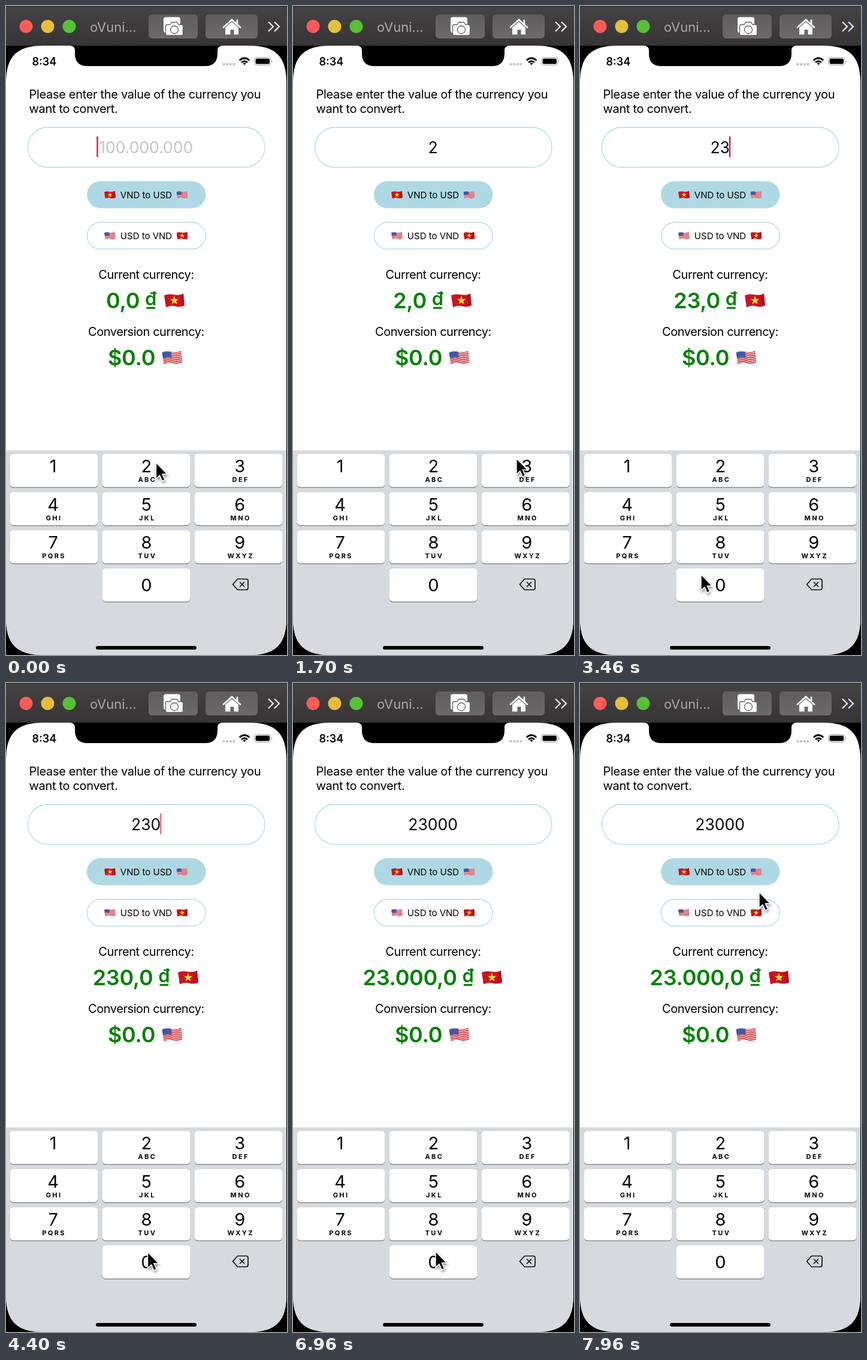
An HTML page that plays this animation: 469 by 1080 pixels, repeating every 8000 ms.

```html
<!DOCTYPE html>
<html lang="en">
<head>
<meta charset="utf-8">
<title>Currency converter</title>
<style>
  html, body { margin: 0; height: 100%; overflow: hidden; background: #000; }
  svg { display: block; font-family: Inter, Roboto, sans-serif; }
  .mid { text-anchor: middle; }
  .label { font-size: 20px; letter-spacing: -.45px; }
  .intro { font-size: 20px; letter-spacing: -.32px; }
  .small { font-size: 15px; }
  .input { font-size: 26.5px; }
  .money { font-size: 36px; font-weight: 600; letter-spacing: -.3px; fill: #0a800a; }
  .dong { font-size: 31px; }
  .digit { font-size: 29px; }
  .letters { font-size: 11px; font-weight: 700; letter-spacing: 2.4px; }
</style>
</head>
<body>
<svg id="stage" width="469" height="1080" viewBox="0 0 469 1080">
  <defs>
    <linearGradient id="bar" x2="0" y2="1"><stop stop-color="#454344"/><stop offset="1" stop-color="#363435"/></linearGradient>
    <linearGradient id="button" x2="0" y2="1"><stop stop-color="#5f5d5e"/><stop offset="1" stop-color="#6b696a"/></linearGradient>
    <clipPath id="screen"><path d="M0 128C0 84 18 66 62 66H406C450 66 468 84 468 128V1018C468 1062 450 1080 406 1080H62C18 1080 0 1062 0 1018Z"/></clipPath>
    <clipPath id="wave"><path d="M0 3.500C6 1 11 1.500 17 2.500S28 3 32 .5L34 20C28 23 23 23 18 21.500S9 20.500 3 23.500Z"/></clipPath>
    <filter id="shadow" x="-50%" y="-30%" width="220%" height="180%"><feDropShadow dx="1" dy="3" stdDeviation="2" flood-opacity=".45"/></filter>
    <symbol id="vn" viewBox="0 0 34 24">
      <g clip-path="url(#wave)">
        <rect width="34" height="24" fill="#cb1220"/>
        <path d="M26 0h8v24h-5z" fill="#9c0c1a" opacity=".45"/>
        <path d="M17 4.500l1.800 5 5.400.2-4.200 3.300 1.500 5.200-4.500-3-4.400 3 1.500-5.200L9.800 9.700l5.400-.2z" fill="#ffdf2b"/>
      </g>
    </symbol>
    <symbol id="us" viewBox="0 0 34 24">
      <g clip-path="url(#wave)">
        <rect width="34" height="24" fill="#f2efef"/>
        <g id="stripes" fill="none" stroke="#cf2a35" stroke-width="1.700"></g>
        <path d="M0 3C6 0 11 1 15 2L16 12C11 10.500 7 11 1.500 13Z" fill="#34499a"/>
        <path d="M3 4.500q6-3 11-.5M3.500 7.300q6-3 11-.5M4 10q6-3 11-.5" fill="none" stroke="#b9c2e0" stroke-dasharray="1 1.500"/>
      </g>
    </symbol>
  </defs>

  <rect width="469" height="66" fill="url(#bar)"/>
  <path d="M0 .5H469" stroke="#1c2227"/>
  <circle cx="33.500" cy="34" r="11" fill="#fc5b57"/>
  <circle cx="69.500" cy="34" r="11" fill="#e5bf3c"/>
  <circle cx="105.500" cy="34" r="11" fill="#57c038"/>
  <text x="140" y="43" font-size="22" fill="#aaa8a9">oVuni...</text>
  <g fill="url(#button)"><rect x="238" y="14" width="82" height="40" rx="6"/><rect x="333" y="14" width="87" height="40" rx="6"/></g>
  <g fill="#fff" stroke="#626061" stroke-width="1.300">
    <rect x="263" y="18.500" width="28" height="26" rx="3.500" stroke="none"/>
    <path d="M269 31h5l2.500-4h9l2.500 4h5q2.500 0 2.500 2.500v13q0 2.500-2.500 2.500h-24q-2.500 0-2.500-2.500v-13q0-2.500 2.500-2.500z"/>
    <circle cx="281" cy="39.500" r="6.500"/>
  </g>
  <path d="M366 36l11-9.500 11 9.500v11.500h-7.500v-8h-6v8H366z" fill="#fff"/>
  <path d="M363 35.500l14-12.500 14 12.500M386 24v6" fill="none" stroke="#fff" stroke-width="2.800" stroke-linecap="round"/>
  <path d="M438 26.500l8 7.800-8 7.800M448 26.500l8 7.800-8 7.800" fill="none" stroke="#e8e8e8" stroke-width="2.200"/>

  <g clip-path="url(#screen)">
    <rect y="66" width="468" height="1014" fill="#fefffe"/>
    <rect y="739.500" width="468" height="341" fill="#d6d9dd"/>
  </g>
  <path d="M107 66q8 .5 8 8v5q0 21 21 21H332q21 0 21-21v-5q0-7.500 8-8z"/>
  <text x="43.500" y="98.500" font-size="18" font-weight="600">8:34</text>
  <path d="M361.500 97h21" stroke="#c9c9c9" stroke-width="4" stroke-dasharray="4 1.600"/>
  <g fill="none" stroke="#000" stroke-width="2.800">
    <path d="M389.800 90.500q8.200-7.500 16.400 0M393 94q5-4.500 10 0"/>
    <path d="M395.500 95.600q2.500-2 5 0l-2.500 2.600z" fill="#000" stroke="none"/>
  </g>
  <rect x="414.500" y="85.500" width="27.500" height="13" rx="4" fill="none" stroke="#a2a2a2"/>
  <rect x="416.500" y="87.500" width="23.500" height="9" rx="2.300"/>
  <path d="M443.500 90q2 2 0 4.500z" fill="#999"/>

  <text class="intro" x="38.500" y="154">Please enter the value of the currency you</text>
  <text class="intro" x="38.500" y="178">want to convert.</text>
  <g fill="none" stroke="#b5dbe7" stroke-width="1.300">
    <rect x="36.500" y="202" width="395.500" height="66.500" rx="33.200"/>
    <rect x="135.500" y="360" width="197.500" height="44.500" rx="22.200"/>
  </g>
  <rect x="135" y="291.500" width="198.500" height="45" rx="22.500" fill="#aed9e4"/>
  <text class="small mid" x="234" y="320">VND to USD</text>
  <text class="small mid" x="234" y="388">USD to VND</text>
  <text class="label mid" x="234" y="454">Current currency:</text>
  <text class="label mid" x="234" y="549">Conversion currency:</text>
  <text class="money mid" x="209.500" y="598">$0.0</text>
  <use href="#vn" x="164" y="307.500" width="19" height="13.400"/>
  <use href="#us" x="284.500" y="307.500" width="19" height="13.400"/>
  <use href="#us" x="164" y="375.500" width="19" height="13.400"/>
  <use href="#vn" x="284.500" y="375.500" width="19" height="13.400"/>
  <use href="#us" x="260.500" y="573" width="34" height="24"/>

  <text id="value" class="input mid" x="233.700" y="244.500"></text>
  <rect id="caret" y="217" width="2.400" height="34.500" fill="#df1426"/>
  <text class="money mid" x="209" y="503"><tspan id="amount"></tspan> <tspan class="dong" dy="-5">₫</tspan></text>
  <use id="flag" href="#vn" y="478" width="34" height="24"/>
  <g id="keys"></g>
  <path d="M386.500 953.500H401q3 0 3 3v12q0 3-3 3H386.500L378.500 962.500ZM390 958.500l8 8m0-8l-8 8" fill="none" stroke="#111" stroke-width="1.700" stroke-linejoin="round"/>
  <rect x="150" y="1065" width="168" height="6" rx="3"/>
  <path id="cursor" d="M0 0V26.500L6 21l4.300 9.500 4.200-2L10.400 19H18.500Z" stroke="#fff" stroke-width="1.400" filter="url(#shadow)"/>
</svg>
<script>
const LOOP = 8000;
const $ = id => document.getElementById(id);

// Time of entry, field text, amount, flag x
const entries = [
  [-300, '', '0,0', 264], [745, '2', '2,0', 264], [2000, '23', '23,0', 275],
  [3830, '230', '230,0', 287], [4660, '2300', '2.300,0', 303], [6100, '23000', '23.000,0', 315]
];
// Key, pressed from, released at
const presses = [
  ['2', 500, 755], ['3', 1790, 2015], ['0', 3640, 3850], ['0', 4510, 4690], ['0', 5890, 6120]
];
// Time, x, y of the pointer
const path = [
  [0, 250.5, 760], [1130, 250.5, 760], [1420, 373, 753], [2560, 373, 753],
  [3290, 201.5, 943], [3400, 202, 946], [3470, 202, 946], [3640, 236.5, 947],
  [5200, 236.5, 947], [5400, 238, 947], [6940, 238, 947], [6960, 238, 946], [7150, 238, 946],
  [7450, 228, 760], [7890, 297, 351], [7960, 299, 348], [LOOP, 299, 348]
];

$('stripes').innerHTML = Array.from({ length: 8 }, (_, i) =>
  `<path d="M0 ${3 + i * 3}C7 ${i * 3} 12 ${i * 3} 17 ${2 + i * 3}S27 ${4 + i * 3} 34 ${1 + i * 3}"/>`).join('');

const keyLetters = ['', 'ABC', 'DEF', 'GHI', 'JKL', 'MNO', 'PQRS', 'TUV', 'WXYZ'];
const drawKey = (digit, col, row, letters) => {
  const x = 6.5 + col * 154, y = 745.6 + row * 63.5, cx = 78.6 + col * 155.8;
  return `<rect x="${x}" y="${y + 1.3}" width="147" height="55" rx="6" fill="#8b8d91"/>
    <rect id="key${digit}" x="${x}" y="${y}" width="147" height="55" rx="6"/>
    <text class="digit mid" x="${cx}" y="${y + (row < 3 ? 30.5 : 37.5)}">${digit}</text>
    <text class="letters mid" x="${cx + 1.5}" y="${y + 46.5}">${letters}</text>`;
};
$('keys').innerHTML = keyLetters.map((s, i) => drawKey(i + 1, i % 3, Math.floor(i / 3), s)).join('')
  + drawKey(0, 1, 3, '');

const clamp = v => Math.min(1, Math.max(0, v));

function caretOpacity(age) {
  if (age < 500) return 1;
  const phase = (age - 500) % 1000;
  return phase < 500 ? 1 - clamp(phase / 200) : clamp((phase - 500) / 180);
}

function pointerAt(t) {
  const i = path.findIndex(p => p[0] > t), a = path[i - 1], b = path[i];
  const u = (t - a[0]) / (b[0] - a[0]), e = u * u * (3 - 2 * u);
  return [1, 2].map(k => a[k] + (b[k] - a[k]) * e);
}

function render(t) {
  const [time, text, sum, flagX] = entries.filter(e => e[0] <= t).pop();
  $('value').textContent = text || '100.000.000';
  $('value').setAttribute('fill', text ? '#0b0b0b' : '#c5c5c8');
  $('amount').textContent = sum;
  $('flag').setAttribute('x', flagX);
  $('caret').setAttribute('x', text ? 232.2 + 8.3 * text.length : 151.3);
  $('caret').setAttribute('opacity', caretOpacity(t - time));
  for (let d = 0; d < 10; d++) {
    const down = presses.some(([key, from, to]) => +key === d && t >= from && t < to);
    $('key' + d).setAttribute('fill', down ? '#b4b9c1' : '#fefffe');
  }
  $('cursor').setAttribute('transform', `translate(${pointerAt(t)})`);
}

const start = performance.now();
(function frame() {
  render((performance.now() - start) % LOOP);
  requestAnimationFrame(frame);
})();
</script>
</body>
</html>
```
